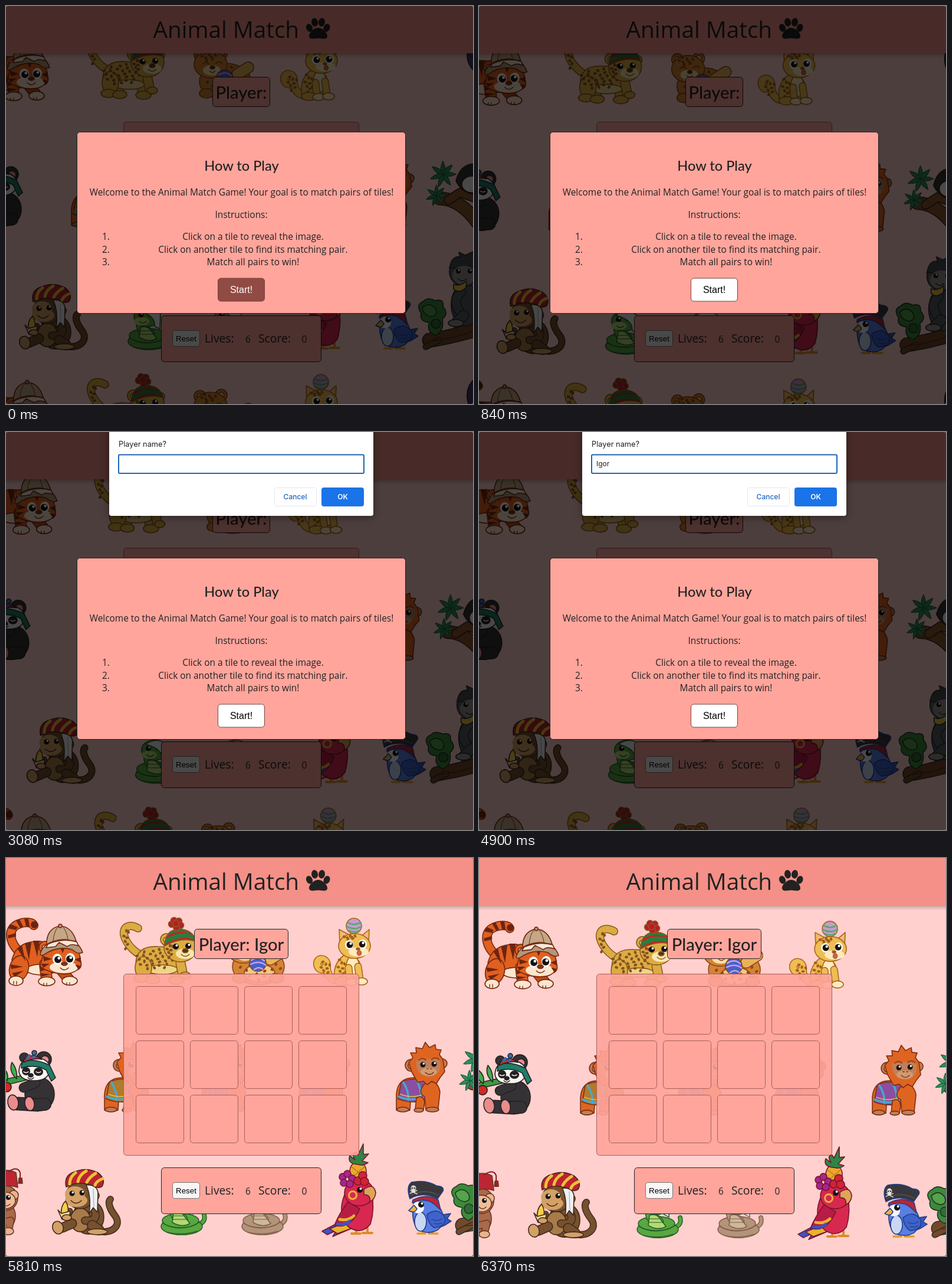
Animation of 792x674 px, one loop 6440 ms. Source, as an HTML page:

```html
<!DOCTYPE html>
<html lang="en">
<head>
<meta charset="utf-8">
<title>Animal Match</title>
<style>
html, body { margin: 0; width: 100%; height: 100%; overflow: hidden; background: #555; }
svg { display: block; width: 792px; height: 674px; border-radius: 3px; }
.body { font-family: "Open Sans", sans-serif; font-size: 15.42px; fill: #222; }
.head { font-family: Lato, sans-serif; font-weight: 500; fill: #222; }
.btn { font-family: "Liberation Sans", Arial, sans-serif; }
.ui { font-family: Inter, sans-serif; font-size: 12px; }
.mid { text-anchor: middle; }
#dialog { filter: drop-shadow(0 2px 7px rgba(0,0,0,.4)); }
</style>
</head>
<body>
<svg id="stage" viewBox="0 0 792 674"></svg>
<script>
const LOOP = 6440, STEP = 70, SPEED = 0.0091, TILE = 578;
const NAME = 'Igor', PINK = '#ffa59c';
const $ = id => document.getElementById(id);

// ---- drawing helpers ----
const E = (x, y, rx, ry, f, rot = 0) =>
  `<ellipse cx="${x}" cy="${y}" rx="${rx}" ry="${ry}" fill="${f}" transform="rotate(${rot} ${x} ${y})"/>`;
const C = (x, y, r, f) => E(x, y, r, r, f);
const P = (d, f) => `<path d="${d}" fill="${f}"/>`;
const line = (d, c, w) => `<path d="${d}" fill="none" stroke="${c}" stroke-width="${w}"/>`;
const limb = (d, c, w) => line(d, 'currentColor', w + 3) + line(d, c, w);
const bare = s => `<g stroke="none">${s}</g>`;
const eye = (x, y, r = 5) => bare(C(x, y, r, '#17120f') + C(x + r * .3, y - r * .4, r * .4, '#fff'));
const smile = (x, y, w = 7) => line(`M${x - w} ${y}q${w} ${w} ${2 * w} 0`, 'currentColor', 1.4);
const animal = (ink, ...parts) => `<g color="${ink}" stroke="currentColor" stroke-width="1.6">${parts.join('')}</g>`;
const spots = (x, y, rx, ry, n, c) => bare(Array.from({ length: n }, (_, i) => {
  const a = i * 2.4, r = Math.sqrt((i + .5) / n);
  return E((x + rx * r * Math.cos(a)).toFixed(1), (y + ry * r * Math.sin(a)).toFixed(1), 2.9, 2.2, c, i * 50);
}).join(''));
const box = (x, y, w, h, f, stroke, r = 5, extra = '') =>
  `<rect x="${x + .5}" y="${y + .5}" width="${w - 1}" height="${h - 1}" rx="${r}" fill="${f}" stroke="${stroke}" ${extra}/>`;
const text = (x, y, cls, s, extra = '') => `<text x="${x}" y="${y}" class="${cls}" ${extra}>${s}</text>`;

// ---- animals ----
const tiger = () => {
  const o = '#e0601f', dark = '#c14d17', w = '#fbe6cf', ink = '#6e2411';
  return animal('#74270f',
    limb('M24 160C6 144 1 120 21 112C34 107 45 109 47 114', o, 13),
    bare(P('M3 131l14-4v6l-13 3ZM3 119l14 3 3-5-12-5ZM17 106l7 12 5-2-6-12ZM31 103l3 13h6l-2-13Z', ink) + C(48, 113, 6, ink)),
    limb('M90 185L107 206', dark, 16),
    P('M10 172Q18 140 58 141Q98 148 90 188Q62 202 40 194Q12 196 10 172', o),
    E(60, 189, 26, 9, w), E(22, 187, 16, 22, o, 15), limb('M66 180L69 205', o, 17),
    E(17, 208, 12, 8, w), E(69, 209, 14, 7.5, w), E(108, 208, 13, 7.5, w),
    bare(P('M32 144l7 29 4-30ZM46 140l7 28 4-28ZM19 153l14 22-6-27ZM61 142l4 24 4-22ZM7 180l22 4-20 4ZM10 195l20-4-15 10ZM58 184l15 3-14 5ZM59 195l17 2-16 4Z', ink)),
    line('M64 212v4m5-4v4m34-5v4m5-4v4M13 209v5m5-5v5', 'currentColor', 1.3),
    C(66, 151, 10, o), C(66, 152, 5, w),
    P('M62 167Q68 145 96 146Q125 146 126 172Q131 186 120 190Q110 198 92 196Q72 194 58 184Z', o),
    bare(E(98, 185, 24, 10, w) + P('M63 166l15 5-14 4ZM60 179l14 0-11 7ZM127 168l-11 4 11 5ZM127 183l-10-3 6 9ZM92 152l4 9 4-9Z', ink)),
    bare(E(87, 171, 8, 9, '#fff') + E(109, 170, 8, 9, '#fff')), eye(88, 172, 6), eye(108, 171, 6),
    E(99, 179, 5, 3, '#7b3426'), smile(99, 186),
    P('M69 147Q68 120 91 115Q112 116 119 141Q95 136 69 147', '#c3a787'),
    P('M58 162Q64 141 96 138Q122 137 130 160Q122 164 112 155Q86 148 64 164Q58 166 58 162', '#b3967a'),
    P('M71 146Q96 135 120 142L123 149Q110 144 104 150L90 143L84 150L68 152Z', '#f3e8db'),
    line('M88 117q-7 8-8 24M97 117q6 8 8 20', 'currentColor', 1), C(92, 115, 3, '#b3967a'));
};
const leopard = () => {
  const y = '#dcac42', b = '#865022';
  return animal('#8a5a1c',
    limb('M242 168C222 166 204 147 200 130C198 114 212 112 224 119', y, 11),
    spots(204, 135, 5, 20, 7, b),
    limb('M250 180L247 203', y, 15), limb('M285 180L288 204', y, 15),
    P('M220 180Q220 148 258 150Q306 150 302 184Q276 196 244 194Q222 198 220 180', y),
    E(265, 189, 26, 8, '#f0d48a'), E(233, 186, 14, 19, y), limb('M296 178L300 198', y, 14),
    E(230, 204, 13, 7, y), E(249, 206, 12, 7, y), E(289, 207, 13, 7, y), E(304, 199, 9, 6, y),
    spots(253, 171, 34, 18, 28, b),
    C(272, 138, 10, y), C(272, 139, 5, '#eebf90'), C(317, 140, 8, y), E(296, 151, 28, 25, y),
    bare(E(304, 162, 16, 9, '#f9e5b0')), spots(278, 156, 6, 13, 7, b), eye(288, 150), eye(309, 149),
    E(304, 157, 5, 3.5, '#5d3219'), smile(304, 163),
    P('M269 149Q269 123 292 120Q318 121 322 141Q296 133 269 149', '#c5212b'),
    bare(P('M271 137Q292 122 318 131L321 139Q295 129 270 146Z', '#2c7d3a') + P('M277 126Q294 118 310 125l2 3Q294 121 274 131Z', '#2c7d3a')),
    [[281, 112], [285, 106], [293, 107], [296, 114], [289, 117], [288, 111]].map(([x, y]) => C(x, y, 5.5, '#b81c28')).join(''));
};
const yarnCat = () => {
  const o = '#d38434', b = '#8f4a17';
  return animal('#8a4514',
    E(428, 184, 44, 31, o), E(430, 195, 26, 15, '#f4c884'), spots(430, 184, 38, 25, 24, b),
    limb('M448 172L467 160', '#e9b25a', 17), E(396, 204, 12, 8, o), E(459, 204, 12, 8, o),
    C(385, 139, 10, o), C(421, 137, 10, o), C(385, 139, 5, '#f0bb84'), C(421, 137, 5, '#f0bb84'),
    E(403, 155, 28, 23, o), spots(400, 142, 16, 7, 8, b), bare(E(405, 165, 15, 9, '#f9dda8')),
    line('M390 154q5-5 10 0m12-1q5-5 10 0', 'currentColor', 2), E(406, 160, 4, 3, '#5d2c13'), smile(406, 166, 5),
    C(427, 178, 14, '#4660cc'), line('M416 173q12-8 22 1M415 180q13-7 25 1M421 189q7-6 14-1', '#c7a0e6', 2.5));
};
const ballCat = () => {
  const y = '#efbd52', b = '#a4611b', c = '#fdeac0';
  return animal('#a9641c',
    limb('M572 206C552 212 543 196 544 182C544 168 526 168 528 181C530 188 535 190 539 187', y, 11), spots(542, 187, 10, 13, 8, b),
    P('M558 208Q552 180 574 164Q606 160 604 208Z', y), E(588, 184, 11, 18, c),
    spots(569, 187, 8, 18, 9, b), limb('M581 186L583 206', y, 10), limb('M597 184L600 206', y, 10),
    E(570, 209, 13, 7, y), E(586, 210, 10, 6, c), E(603, 209, 10, 6, c),
    P('M566 145L565 121L582 130ZM604 131L616 121L615 146Z', y), bare(P('M569 138L569 126L578 132ZM607 132L613 126L612 139Z', '#f5b59b')),
    E(591, 149, 27, 21, y), bare(E(598, 159, 17, 8, c)), spots(583, 134, 12, 4, 7, b),
    bare(E(582, 147, 7, 8, '#fff') + E(605, 146, 7, 8, '#fff')), eye(583, 147, 5.5), eye(604, 146, 5.5),
    E(597, 154, 3, 2, '#a9443d'), E(599, 161, 3.5, 4, '#e5595b'),
    C(590, 115, 13, '#c79bd0'), line('M579 109q12 7 22 0M578 116q12 7 25 0M582 123q8 5 17 0', '#56a96a', 2.5));
};
const panda = () => animal('#252123',
  limb('M-20 384L32 372', '#3b9b44', 8),
  P('M18 374Q4 362 10 346Q20 358 18 374ZM2 377Q-14 366 -6 354Q6 364 2 377Z', '#43ad4d'),
  C(1, 388, 8, '#d32923'), E(57, 400, 25, 28, '#353236'),
  limb('M50 381L30 389', '#353236', 14), limb('M54 418L20 416', '#353236', 20), limb('M66 417L48 418', '#353236', 19),
  E(12, 414, 9, 13, '#e98c8b', -10), E(40, 416, 8, 12, '#e98c8b', -10),
  C(64, 341, 13, '#353236'), C(66, 342, 7, '#e98c8b'), C(31, 338, 8, '#353236'),
  P('M22 362Q22 340 48 337Q76 340 75 360Q70 378 46 377Q25 377 22 362', '#f8f4ef'),
  bare(E(34, 361, 7, 7, '#252123', 20) + E(55, 362, 8, 7, '#252123')),
  line('M30 362q4 3 8 0m13 0q4 3 8 0', '#fff', 1.4), E(42, 368, 4, 3, '#252123'), smile(42, 372, 5),
  P('M27 346Q46 337 74 351L84 372L77 378L68 359Q48 348 26 356Z', '#1f7d68'),
  P('M30 342Q43 328 61 341Q46 338 30 346Z', '#c42b35'), line('M36 339l4-5m6 4l4-6', '#356bb5', 4), C(48, 330, 4, '#356bb5'));
const orang = (x, vest) => {
  const o = '#df6420', tan = '#c07f58';
  return `<g transform="translate(${x} 0)">` + animal('#7c2f12',
    P('M2 400Q4 372 32 372L60 380L52 412L40 414L26 412L25 427Q12 432 2 427Z', o),
    P('M10 380Q32 368 62 382L56 408Q30 418 5 408Z', vest),
    line('M6 404Q30 414 55 403M14 380Q24 396 22 410M36 376Q46 394 43 409', '#48a8cc', 3.5),
    line('M9 400Q30 409 54 398', '#e9c04e', 1.5),
    P('M52 380Q72 374 76 396L73 424Q62 431 52 426L50 404Q36 398 52 380', o),
    P('M36 406Q48 400 50 414L48 427Q38 431 34 426Z', o),
    E(13, 426, 10, 4, tan), E(63, 426, 11, 4, tan), E(40, 427, 8, 3.5, tan),
    C(27, 351, 10, tan), C(80, 348, 8, tan), C(27, 352, 5, '#d79c78'),
    P('M28 362L23 346L30 338L26 330L36 330L35 321L46 323L51 312L58 321L68 316L69 324L78 325L75 333L81 341L84 362L76 372L70 382L62 378L54 384L48 378L38 380Z', o),
    bare(P('M36 352Q34 338 46 338Q56 344 66 337Q78 338 77 352Q76 368 58 371Q38 368 36 352', tan) + E(57, 362, 14, 7, '#d39a70')),
    line('M40 342q6-5 12 0m10-1q6-5 12 0', '#a3441b', 2.5), eye(47, 350, 4.5), eye(66, 349, 4.5),
    line('M54 357h2m4 0h2', 'currentColor', 1.6), smile(58, 363, 7)) + '</g>';
};
const treePanda = () => animal('#2e2318',
  limb('M792 382Q830 383 862 432', '#8d532c', 20), limb('M806 385L826 372L870 388', '#8d532c', 13),
  P('M819 352Q828 318 860 324V376Q830 376 819 352', '#353236'), E(846, 358, 17, 14, '#f8f4ef'),
  bare([[797, 341, 15], [786, 377, 12]].map(([x, y, r]) => [0, 55, 110, 160, 215, 270, 315].map(a =>
    `<path d="M0 0Q${r / 2} ${-r / 2} ${r * 1.5} 0Q${r / 2} ${r / 2} 0 0" fill="#2f8d5b" stroke="#175236" stroke-width="1" transform="translate(${x} ${y}) rotate(${a})"/>`).join('')).join('')));
const fezMonkey = () => animal('#6c3622',
  E(-4, 606, 20, 24, '#a9694b'), limb('M-4 617L8 614L5 627', '#a9694b', 10), E(4, 632, 9, 6, '#e9b38e'),
  E(-1, 576, 21, 21, '#a9694b'), C(13, 571, 8, '#e9b38e'), E(-1, 580, 17, 14, '#efbd98'), eye(4, 575, 4), smile(1, 586, 6),
  P('M-18 562L-12 531Q3 526 17 533L20 558Q2 551 -18 562', '#bd2532'),
  line('M4 531Q20 521 24 533V544', '#821923', 2), P('M22 542l5 0 1 9-7 0Z', '#9c1d28'));
const turbanMonkey = () => {
  const b = '#76512f', t = '#d3a066';
  return animal('#41281a',
    limb('M150 630C180 640 197 622 185 606C174 592 173 582 177 578', b, 9),
    E(140, 608, 26, 29, b), E(126, 613, 17, 20, '#a87b4b'),
    limb('M150 596Q158 616 134 614', b, 11), limb('M146 622L158 630', b, 15), limb('M112 619L96 626', b, 14),
    E(155, 633, 17, 5, t), E(88, 626, 9, 11, t, -20),
    C(150, 572, 8, t), E(126, 571, 24, 23, b), bare(E(117, 569, 17, 13, t) + E(119, 580, 19, 11, t)),
    eye(112, 568, 4.5), eye(129, 567, 4.5), smile(119, 580, 9),
    P('M136 554Q153 552 156 566L155 600L148 592L141 602Q145 572 136 554', '#eef0f2'), line('M148 560L149 590', '#a9b0bb', 1.2),
    P('M102 557Q98 540 112 533Q136 522 156 533Q170 544 163 556Q156 561 147 555Q124 546 102 557Z', '#bd2230'),
    line('M108 552Q108 540 118 533M122 548Q124 537 136 530M137 549Q142 540 152 534M151 554Q153 547 164 543', '#ecc23a', 5),
    limb('M108 598L104 606', b, 8),
    P('M94 607Q92 589 101 581Q108 591 104 608Z', '#f6cf4a'), P('M94 602L88 596L95 612L107 610L109 598Z', '#f3dda0'), E(103, 609, 8, 5, t));
};
const snake = (x, c, belly, ink) => `<g transform="translate(${x} 0)">` + animal(ink,
  limb('M66 622Q84 618 80 604', c, 5),
  E(42, 624, 35, 14, c), E(40, 614, 31, 12, c), limb('M42 612Q22 598 38 580', c, 18),
  line('M9 618Q38 636 72 617M18 634Q42 640 68 632', 'currentColor', 1.4),
  P('M28 600Q40 596 46 606L56 619Q42 627 26 617Z', belly), line('M28 606h17M27 612h24', 'currentColor', 1),
  E(39, 582, 22, 17, c), bare(E(30, 590, 13, 7, belly)), eye(29, 579, 4.5), eye(45, 578, 4.5), smile(32, 590, 6),
  P('M24 572Q44 558 62 574L61 603L52 598Q54 580 24 572', '#eef0f2')) + '</g>';
const parrot = () => animal('#7a1430',
  line('M594 628v7m-8 1h15M613 626v9m-8 0h16', '#e08a26', 4),
  P('M578 610L536 632L545 638L560 631L554 641L594 624Z', '#3e52c4'), P('M584 614L549 628L562 636L600 622Z', '#e8b32d'),
  P('M576 566Q560 600 580 624Q602 640 618 620Q626 594 620 565Z', '#d8284f'),
  P('M580 582Q564 604 557 622Q584 630 600 594Z', '#b81c45'), line('M566 612Q580 615 590 606', '#e8b32d', 5), line('M562 620Q575 622 583 615', '#3e52c4', 5),
  E(599, 567, 25, 22, '#d8284f'), bare(C(588, 571, 8, '#eeb23c') + C(588, 571, 5, '#d8284f')),
  P('M607 561Q624 549 627 567Q626 578 617 582Q619 570 607 570Z', '#dfa556'), eye(600, 562, 5),
  E(597, 531, 14, 17, '#e9a92c'), line('M586 523l22 17M585 535l17 11M609 522l-23 20', '#b2711c', 1.2),
  P('M597 519Q578 518 583 504L592 511Q584 498 594 498L597 503L606 484L606 502L615 501L604 513L614 516Q605 522 597 519', '#2e8545'),
  [[571, 540], [579, 535], [587, 543], [573, 550], [583, 552]].map(([x, y]) => C(x, y, 6, '#a62690')).join(''),
  [[597, 547], [605, 538], [608, 548]].map(([x, y]) => C(x, y, 7, '#d32235')).join(''));
const pirateBird = () => animal('#263c86',
  P('M728 606L754 602L748 611L755 615L744 622L720 632Z', '#355bc4'),
  line('M708 632l-3 4m-7 0h13M722 632l3 4m-8 0h15', '#e29a2d', 3.5),
  P('M692 580Q686 610 696 626Q712 640 732 630Q748 616 738 596Q724 574 692 580', '#587fe4'), E(703, 616, 10, 16, '#c9d7f4'),
  P('M714 604Q732 590 744 608Q748 624 726 626Q716 620 714 604', '#3d63cc'), line('M722 612q10 4 18-1M726 619q8 2 13-1', 'currentColor', 1.2),
  bare(E(699, 592, 10, 10, '#f5f6fb')), P('M692 588L683 597Q693 603 697 594Z', '#efb13b'), eye(704, 587, 5),
  P('M690 579Q714 567 733 579L737 596L726 586Q710 574 689 584Z', '#b92634'),
  P('M685 577Q678 556 688 549Q712 544 730 555Q744 556 741 564L732 577Q708 564 685 577', '#38383c'),
  line('M687 571Q710 559 733 571', '#56565c', 1.4),
  bare(C(691, 559, 4.5, '#e5e2db') + E(691, 564, 3, 3, '#e5e2db')), eye(689, 559, 1.4), eye(693, 559, 1.4), line('M685 568l12-5m-11 0l11 6', '#e5e2db', 1.5));
const gorilla = () => animal('#25302a',
  limb('M774 622Q806 618 860 602', '#75482a', 22), limb('M768 633L790 622', '#75482a', 8),
  line('M780 623Q815 620 860 602', '#4f2c19', 1.6),
  P('M760 576Q750 562 764 556Q771 548 784 555Q799 551 797 565Q808 577 796 586Q800 606 784 614Q768 606 774 592Q756 590 760 576', '#3b8a39'),
  P('M762 567Q774 556 784 568Q790 580 778 582Q764 580 762 567', '#55a34a'), C(785, 594, 8, '#2c6f30'),
  E(835, 562, 24, 36, '#565b60'), limb('M828 540Q812 555 825 572', '#565b60', 14), limb('M832 580L820 592', '#565b60', 16),
  E(819, 593, 13, 6, '#97928c'), E(834, 506, 26, 25, '#565b60'),
  P('M808 500Q812 478 826 481L824 473L835 478L848 472L852 500Z', '#464b50'),
  bare(E(833, 512, 20, 16, '#97928c')), eye(823, 505, 4), eye(843, 505, 4), smile(830, 518), P('M815 535Q824 544 836 533L837 522Q825 532 815 527Z', '#efc33f'));
const panther = () => animal('#18142a', E(862, 138, 24, 32, '#3c3960'));

const herd = [tiger(), leopard(), yarnCat(), ballCat(), panther(), panda(),
  orang(165, '#b07b2c'), orang(330, '#8a4fa0'), orang(495, '#8a4fa0'), orang(660, '#8a4fa0'), treePanda(),
  fezMonkey(), turbanMonkey(), snake(256, '#58a83f', '#b5d873', '#265e2a'), snake(393, '#b3947a', '#cfb79b', '#80614a'),
  parrot(), pirateBird(), gorilla()].join('');

// ---- page ----
const cells = [217, 309, 401].map(y => [220, 312, 404, 496].map(x =>
  box(x, y, 82, 82, PINK, '#a85f59')).join('')).join('');
const paw = `<g fill="#222">${E(514.5, 37, 5.3, 7, '#222', -22)}${E(523.5, 27.5, 5.5, 7.2, '#222', -8)}${E(535.5, 27.5, 5.5, 7.2, '#222', 8)}${E(544, 37, 5.3, 7, '#222', 22)}
  <path d="M529.5 37C537 37 546 46 545 52C543 58 535 54.5 529.5 54.5S516 58 514 52C513 46 522 37 529.5 37"/></g>`;
const steps = ['Click on a tile to reveal the image.', 'Click on another tile to find its matching pair.', 'Match all pairs to win!'];

$('stage').innerHTML = `
<defs>
  <linearGradient id="shade" x2="0" y2="1">
    <stop stop-color="#000" stop-opacity=".25"/><stop offset=".5" stop-color="#000" stop-opacity=".1"/><stop offset="1" stop-color="#000" stop-opacity="0"/>
  </linearGradient>
</defs>
<rect width="792" height="674" fill="#ffd0ce"/>
<g id="scene" stroke-linecap="round" stroke-linejoin="round"><g id="herd">${herd}</g><use href="#herd" y="${TILE}"/></g>
<rect y="80" width="792" height="9" fill="url(#shade)"/>
<rect width="792" height="80" fill="#f49087"/>
${text(249.5, 54, 'body', 'Animal Match', 'style="font-size:38.7px"')}${paw}
<g id="player"></g>
${box(199, 196, 400, 308, PINK, '#a85f59', 5, 'fill-opacity=".9"')}${cells}
${box(263, 524, 272, 79, PINK, '#222')}
${box(282, 549, 47, 28, '#f8f6f6', '#777', 4)}
${text(305.5, 567.5, 'btn mid', 'Reset', 'font-size="13.33"')}
${text(337, 570, 'body', 'Lives:', 'style="font-size:19.3px"')}${text(410.5, 570, 'body mid', '6')}
${text(428, 570, 'body', 'Score:', 'style="font-size:19.3px"')}${text(506, 570, 'body mid', '0')}
<g id="modal">
  <rect width="792" height="674" opacity=".7"/>
  ${box(120, 213, 558, 308, PINK, '#222')}
  ${text(399.5, 279, 'head mid', 'How to Play', 'font-size="23.6"')}
  ${text(399.5, 321, 'body mid', 'Welcome to the Animal Match Game! Your goal is to match pairs of tiles!')}
  ${text(399, 358.5, 'body mid', 'Instructions:')}
  ${steps.map((s, i) => text(163, 396 + i * 21.6, 'body', i + 1 + '.') + text(419, 396 + i * 21.6, 'body mid', s)).join('')}
  <g id="start">${box(359, 460.5, 80, 40, '#fff', '#7a423c')}${text(399, 486, 'btn mid', 'Start!', 'font-size="16"')}</g>
</g>
<g id="dialog">
  <path d="M175 -20H623V138Q623 142 619 142H179Q175 142 175 138Z" fill="#fff"/>
  ${text(191, 25, 'ui', 'Player name?', 'style="font-size:12.8px" fill="#202124"')}
  <rect x="191" y="38.5" width="416" height="31.5" rx="2" fill="#fff" stroke="#2065b4" stroke-width="2"/>
  ${text(199, 58, 'ui', '', 'id="typed" fill="#202124"')}
  <rect id="caret" y="46" width="1" height="15" fill="#222"/>
  ${box(455, 94, 72, 32, '#fff', '#e4e7ec', 3)}${text(490.5, 114, 'ui mid', 'Cancel', 'fill="#2065c0" font-weight="500"')}
  ${box(535, 94, 72, 32, '#1a73e8', '#1a73e8', 3)}${text(571, 114, 'ui mid', 'OK', 'fill="#fff" font-weight="600"')}
</g>`;

// ---- timeline ----
const OPEN = 1330, CLOSE = 5390, KEYS = [3920, 4270, 4340, 4410], BLINKS = [2030, 2520, 3080, 3570, 4900];
const show = (id, on) => $(id).setAttribute('display', on ? 'inline' : 'none');

function setPlayer(name) {
  const w = name ? 160 : 98, label = name ? 'Player: ' + name : 'Player:';
  $('player').innerHTML = box(399 - w / 2, 120, w, 51, PINK, '#222') + text(399, 156.5, 'head mid', label, 'font-size="29.2"');
}

function dialogAlpha(t) {
  if (t < OPEN || t >= CLOSE + 140) return 0;
  if (t >= CLOSE) return t < CLOSE + STEP ? .65 : .2;
  return [.3, .76, .96, 1][Math.min(3, (t - OPEN) / STEP)];
}

let last = -1;
function draw(now) {
  const t = Math.floor(now % LOOP / STEP) * STEP;
  if (t !== last) {
    last = t;
    const done = t >= CLOSE;
    const d = (done ? SPEED * (t - 5810) : SPEED * Math.min(t, 1400) - 56).toFixed(2);
    $('scene').setAttribute('transform', `translate(${d} ${d})`);
    setPlayer(done ? NAME : '');
    show('modal', !done);

    const hover = t < 770, [face, label] = $('start').children;
    face.setAttribute('fill', hover ? '#914b44' : '#fff');
    label.setAttribute('fill', hover ? '#fff' : '#000');

    const a = dialogAlpha(t), away = 1 - a;
    show('dialog', a > 0);
    $('dialog').setAttribute('opacity', a);
    $('dialog').setAttribute('transform',
      `translate(399 ${-21 * away}) scale(${1 - .033 * away}) translate(-399 0)`);

    $('typed').textContent = NAME.slice(0, KEYS.filter(k => t >= k).length);
    $('caret').setAttribute('x', 199 + Math.round($('typed').getComputedTextLength()));
    show('caret', BLINKS.filter(b => t >= b).length % 2 === 0);
  }
  requestAnimationFrame(n => draw(Math.max(0, n - begin)));
}
const begin = performance.now();
draw(0);
</script>
</body>
</html>
```
